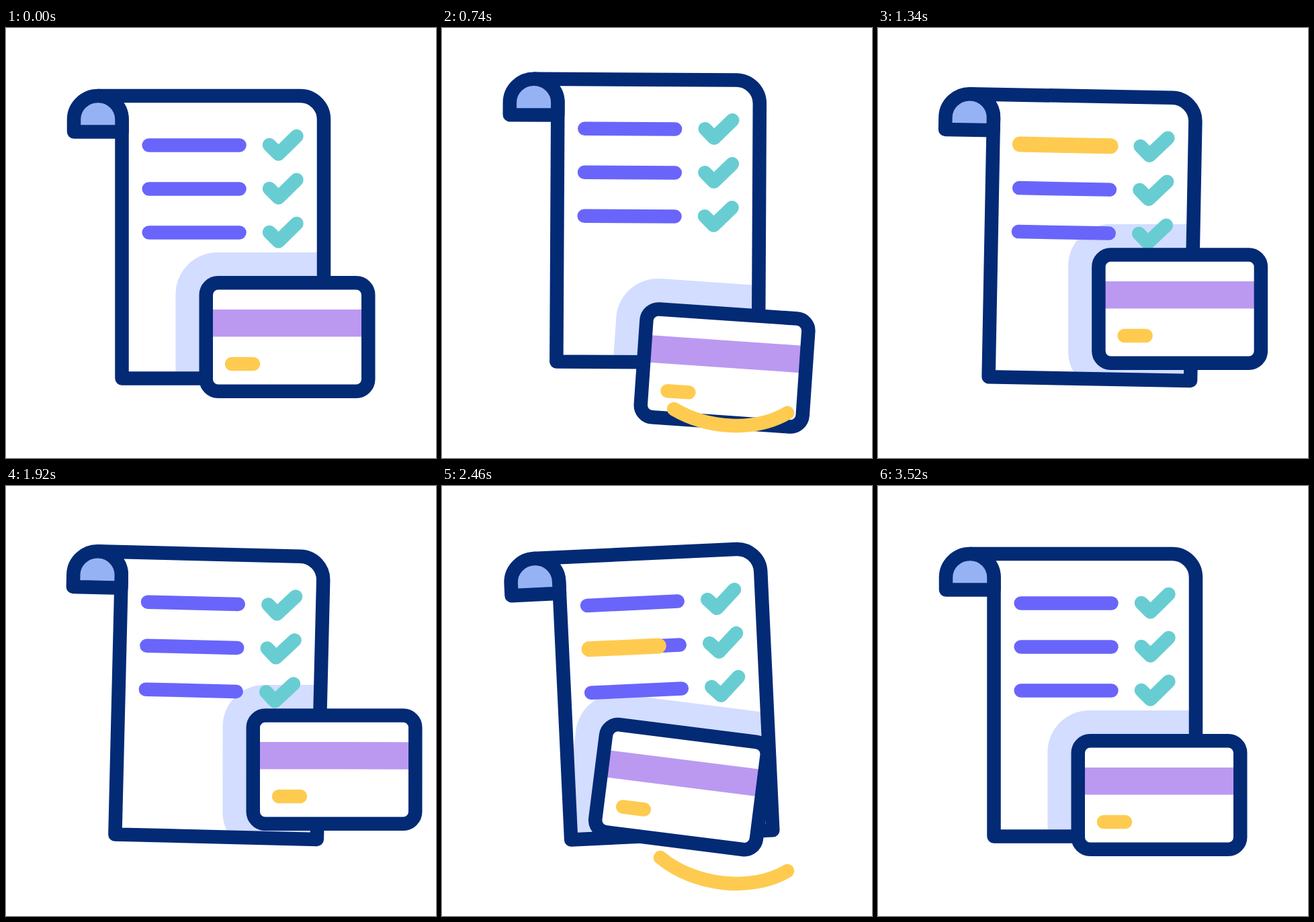
An HTML page that plays this animation: 640x640 px, repeating every 3.6 s.

```html
<!DOCTYPE html>
<html lang="en">
<head>
<meta charset="utf-8">
<title>Checklist and card</title>
<style>
  html, body { margin: 0; width: 100%; height: 100%; overflow: hidden; background: #fff; }
  svg { display: block; width: 100vw; height: 100vh; }
  .s { fill: none; stroke-width: 20.5; stroke-linecap: round; stroke-linejoin: round; }
  .navy { stroke: #032a75; }
  .violet { stroke: #6965fa; }
  .teal { stroke: #68cdd2; }
  .gold { stroke: #fecb50; }
  .wide { stroke-width: 23; }
</style>
</head>
<body>
<svg viewBox="0 0 640 640">
  <defs>
    <path id="body" d="M137 101H438A35 35 0 0 1 473 136V521.5H172.5V136A35.5 35 0 0 0 137 101Z"/>
    <clipPath id="inside"><use href="#body"/></clipPath>
  </defs>
  <g id="paper">
    <use href="#body" fill="#fff"/>
    <g clip-path="url(#inside)">
      <g id="unpaper">
        <rect id="shade" x="-166" y="-126" width="332" height="252" rx="62" fill="#d2ddff"/>
      </g>
    </g>
    <g id="rows"></g>
    <use href="#body" class="s navy"/>
    <path class="s navy" style="fill:#95b3f4" d="M101 154.5V136A36 35 0 0 1 137 101A35.5 35 0 0 1 172.5 136V154.5Z"/>
  </g>
  <g id="card">
    <rect x="-120.75" y="-80.65" width="241.5" height="161.3" rx="18" fill="#fff"/>
    <rect x="-112" y="-41" width="224" height="40.5" fill="#bb99f1"/>
    <path class="s gold" d="M-82.5 40H-50.5"/>
    <rect class="s navy" x="-120.75" y="-80.65" width="241.5" height="161.3" rx="18"/>
  </g>
  <path id="swoosh" class="s gold" pathLength="1" d="M514 573C460 605 375 595 325 553"/>
  <path id="ray1" class="s gold" pathLength="1" d="M453.5 63L460 31.5"/>
  <path id="ray2" class="s gold" pathLength="1" d="M512.5 130L546 123"/>
</svg>
<script>
const LOOP = 3600, CYCLE = 1500;
const $ = id => document.getElementById(id);
const clamp = x => Math.min(1, Math.max(0, x));
const span = (t, a, b) => clamp((t - a) / (b - a));
const sine = p => (1 - Math.cos(Math.PI * p)) / 2;
const quad = p => p < .5 ? 2 * p * p : 1 - 2 * (1 - p) * (1 - p);
const ease = (t, a, b) => sine(span(t, a, b));
const mix = (a, b, u) => a + (b - a) * u;
const mix2 = (a, b, u) => a.map((v, i) => mix(v, b[i], u));

// De Casteljau evaluation for any number of control points
function bezier(pts, u) {
  while (pts.length > 1) pts = pts.slice(1).map((p, i) => mix2(pts[i], p, u));
  return pts[0];
}

// Eased value through [time, value] keys
function keyed(keys, t) {
  let v = keys[0][1];
  for (let i = 1; i < keys.length; i++) {
    const [a, from] = keys[i - 1], [b, to] = keys[i];
    if (t >= a) v = mix(from, to, ease(t, a, b));
  }
  return v;
}

function trim(el, from, to) {
  const on = to > from + .001;
  el.style.display = on ? "" : "none";
  if (on) el.setAttribute("stroke-dasharray", `0 ${from} ${to - from} 3`);
}

const rows = [174.5, 239.5, 304.5].map((y, i) => {
  $("rows").insertAdjacentHTML("beforeend",
    `<path class="s violet" d="M212.7 ${y}H347.5"/>
     <path id="mark${i}" class="s gold wide" pathLength="1" d="M212.7 ${y}H347.5"/>
     <path id="tick${i}" class="s teal" d="M392 ${y - .5}L405.5 ${y + 13}L432.5 ${y - 13.5}"/>`);
  return { y, mark: $("mark" + i), tick: $("tick" + i) };
});

const REST = [418.5, 460], RIGHT = [488.5, 421.5], LEFT = [354, 432];
const DOWN = [RIGHT, [490, 524], [360, 540], LEFT];
const BACK = [LEFT, [418.5, 411], RIGHT];
const TILT = [[620, 0], [1215, 3], [1545, -3], [2120, 3], [2520, -3], [3000, 0]];
const HOP = [[140, 0], [490, 80], [890, 0]];
const SWEEP = [1050, 2290];
const PX = 287, PY = 105;

function cardPose(t) {
  if (t < 400) return [...mix2(REST, RIGHT, quad(span(t, 140, 400))), 0];
  if (t > 3190) return [...mix2(RIGHT, REST, quad(span(t, 3190, 3520))), 0];
  const p = t >= 400 + CYCLE ? t - CYCLE : t;
  if (p < 1070) {
    const u = quad(span(p, 400, 1070));
    return [...bezier(DOWN, u), 7.6 * u];
  }
  return [...bezier(BACK, quad(span(p, 1070, 1505))), 7.6 * (1 - ease(p, 1070, 1320))];
}

function draw(t) {
  const tilt = keyed(TILT, t), hop = keyed(HOP, t);
  $("paper").setAttribute("transform", `translate(0 ${-hop}) rotate(${tilt} ${PX} ${PY})`);
  $("unpaper").setAttribute("transform", `rotate(${-tilt} ${PX} ${PY}) translate(0 ${hop})`);

  const [x, y, turn] = cardPose(t);
  const pose = `translate(${x} ${y}) rotate(${turn})`;
  $("card").setAttribute("transform", pose);
  $("shade").setAttribute("transform", pose);

  const p = t >= CYCLE + 400 ? t - CYCLE : t;
  trim($("swoosh"), ease(p, 970, 1170), ease(p, 540, 800));

  rows.forEach((r, i) => {
    const s = i < SWEEP.length ? t - SWEEP[i] : -1;
    trim(r.mark, ease(s, 320, 640), ease(s, 0, 252));
    const k = 1 + .15 * Math.sin(Math.PI * span(s, 490, 710)) ** 2;
    r.tick.setAttribute("transform",
      `translate(412 ${r.y}) scale(${k}) translate(-412 ${-r.y})`);
  });

  for (const id of ["ray1", "ray2"])
    trim($(id), ease(t, 2950, 3150), ease(t, 2805, 3000));
}

function tick(now) {
  draw(now % LOOP);
  requestAnimationFrame(tick);
}
draw(0);
requestAnimationFrame(tick);
</script>
</body>
</html>
```
